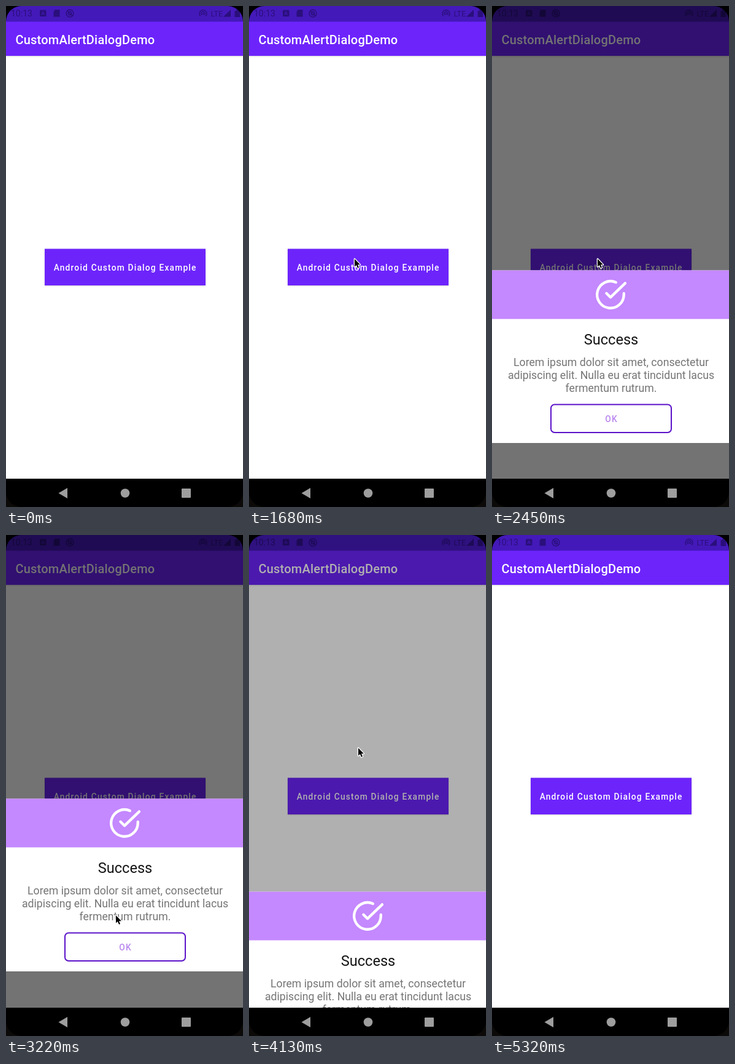
An HTML page for the animation above (5460 ms loop, 386x814 px).

```html
<!DOCTYPE html>
<html lang="en">
<head>
<meta charset="utf-8">
<title>Custom alert dialog</title>
<style>
  html, body { margin: 0; width: 100%; height: 100%; overflow: hidden; background: #000; }
  svg { display: block; width: 386px; height: 814px; font-family: Roboto, sans-serif; }
  .mid { text-anchor: middle; }
  .medium { font-weight: 500; }
  .caps { font-size: 13.77px; letter-spacing: 1.2px; }
  .status { fill: #2a0f7c; }
  .line { fill: none; stroke: #2a0f7c; stroke-width: 1.4; }
  .raised { filter: drop-shadow(0 1px 1px rgba(0, 0, 0, .16)); }
  #nav { fill: #9e9e9e; }
  #cursor { stroke: #fff; stroke-width: 2.6; stroke-linejoin: round; paint-order: stroke; }
  .bright #nav { fill: #f2f2f2; }
  .bright .label { stroke: #fff; stroke-width: .45px; }
  .bright #cursor { stroke: none; }
</style>
</head>
<body>
<svg id="stage" viewBox="0 0 386 814">
  <defs><clipPath id="content"><rect width="386" height="768"/></clipPath></defs>
  <rect width="386" height="768" fill="#fff"/>

  <rect class="raised" y="25" width="386" height="56" fill="#6d24fb"/>
  <rect width="386" height="25.500" fill="#4419b9"/>
  <g class="status">
    <text x="8" y="17" font-size="14">10:13</text>
    <rect x="55" y="6.500" width="10.500" height="10.500" rx="1.500"/>
    <path d="M80 6H87.500V17.500H77.500V9Z"/>
    <text x="333.500" y="16.500" font-size="12.500">LTE</text>
    <path d="M366 6V17.500H354Z M372.500 8H375V6H379V8H381V18H372.500Z"/>
    <circle cx="321" cy="13" r="1.300"/>
  </g>
  <path d="M57.800 14.500L60.200 9L62.700 14.500M58.800 12.800H61.700" fill="none" stroke="#4419b9"/>
  <g class="line">
    <circle cx="104" cy="12" r="6"/>
    <circle cx="104" cy="12" r="2.800"/>
    <path d="M100 8L108.500 16.500M316.500 16.500A6 6 0 1 1 325.500 16.500M318.800 14.500A3 3 0 1 1 323.200 14.500"/>
  </g>

  <text class="medium label" x="15.400" y="62" font-size="20" letter-spacing=".22" fill="#fff">CustomAlertDialogDemo</text>
  <rect class="raised" x="63" y="394.500" width="262" height="59.500" fill="#6d24fb"/>
  <text class="medium caps label" x="77.700" y="430" fill="#fff">Android Custom Dialog Example</text>

  <rect id="dim" width="386" height="768"/>

  <g clip-path="url(#content)">
    <g id="dialog">
      <rect y="428.500" width="386" height="280.500" fill="#fff"/>
      <rect y="428.500" width="386" height="79" fill="#c488ff"/>
      <g transform="translate(166.800 441.800) scale(2.180)" fill="none" stroke="#fff" stroke-width="2"
         stroke-linecap="round" stroke-linejoin="round">
        <path d="M22 11.080V12a10 10 0 1 1-5.930-9.140"/>
        <path d="M23 3.500L12 14L9 11"/>
      </g>
      <text class="mid" x="194" y="549" font-size="23.600" fill="#151515">Success</text>
      <g class="mid" font-size="17.700" fill="#757575">
        <text x="194" y="584">Lorem ipsum dolor sit amet, consectetur</text>
        <text x="194" y="605">adipiscing elit. Nulla eu erat tincidunt lacus</text>
        <text x="194" y="625.500">fermentum rutrum.</text>
      </g>
      <rect x="96" y="646.500" width="196" height="45.500" rx="6" fill="none" stroke="#5b12c9" stroke-width="2"/>
      <text class="mid medium caps" x="194.600" y="674.500" fill="#b987ee">OK</text>
    </g>
  </g>

  <rect y="768" width="386" height="46"/>
  <g id="nav">
    <path d="M85.500 791.500L100 783V800Z"/>
    <circle cx="194" cy="791.500" r="7.300"/>
    <rect x="286" y="784" width="15" height="15" rx="1"/>
  </g>
  <path d="M0 0H25A25 25 0 0 0 0 25ZM386 0H361A25 25 0 0 1 386 25Z"/>
  <path d="M0 789A25 25 0 0 0 25 814H0ZM386 789A25 25 0 0 1 361 814H386Z" fill="#0c0a08"/>

  <path id="cursor" d="M0 0V12.500L2.900 10L5 14.800L7 13.900L5 9.300H9Z"/>
</svg>
<script>
  const LOOP = 5460, STEP = 70;
  const $ = id => document.getElementById(id);
  const stage = $('stage'), dim = $('dim'), dialog = $('dialog'), cursor = $('cursor');

  const ramp = (t, from, to) => Math.min(1, Math.max(0, (t - from) / (to - from)));
  const easeIn = p => p ** 3;
  const easeOut = p => 1 - (1 - p) ** 3;

  const entry = { x: 235, y: 750 };
  const moves = [
    { from: 350, to: 770, x: 190, y: 522, ease: easeOut },
    { from: 1050, to: 1680, x: 172, y: 411, ease: easeOut },
    { from: 2870, to: 3010, x: 179, y: 618, ease: easeOut },
    { from: 3640, to: 3920, x: 178, y: 346, ease: easeIn },
    { from: 4340, to: 4550, x: 178, y: 411, ease: easeOut }
  ];

  function pointer(t) {
    let { x, y } = entry;
    for (const move of moves) {
      const p = move.ease(ramp(t, move.from, move.to));
      x += (move.x - x) * p;
      y += (move.y - y) * p;
    }
    return `translate(${x} ${y})`;
  }

  const shade = t => .55 * (ramp(t, 2100, 2385) - ramp(t, 3990, 4310));

  // Slides up from the navigation bar, then back down behind it.
  function slide(t) {
    const enter = 1 - ramp(t, 2240, 2460);
    const leave = ramp(t, 3990, 4200);
    return 340 * (enter ** 2 + leave ** 2);
  }

  function draw(now) {
    const t = Math.floor(now % LOOP / STEP) * STEP;
    dim.setAttribute('opacity', shade(t));
    dialog.setAttribute('transform', `translate(0 ${Math.round(slide(t))})`);
    cursor.setAttribute('transform', pointer(t));
    cursor.setAttribute('visibility', t >= 350 && t < 5250 ? 'visible' : 'hidden');
    stage.classList.toggle('bright', t >= 4200 && t < 4480);
  }

  const start = performance.now();
  function tick() {
    draw(performance.now() - start);
    requestAnimationFrame(tick);
  }
  tick();
</script>
</body>
</html>
```
